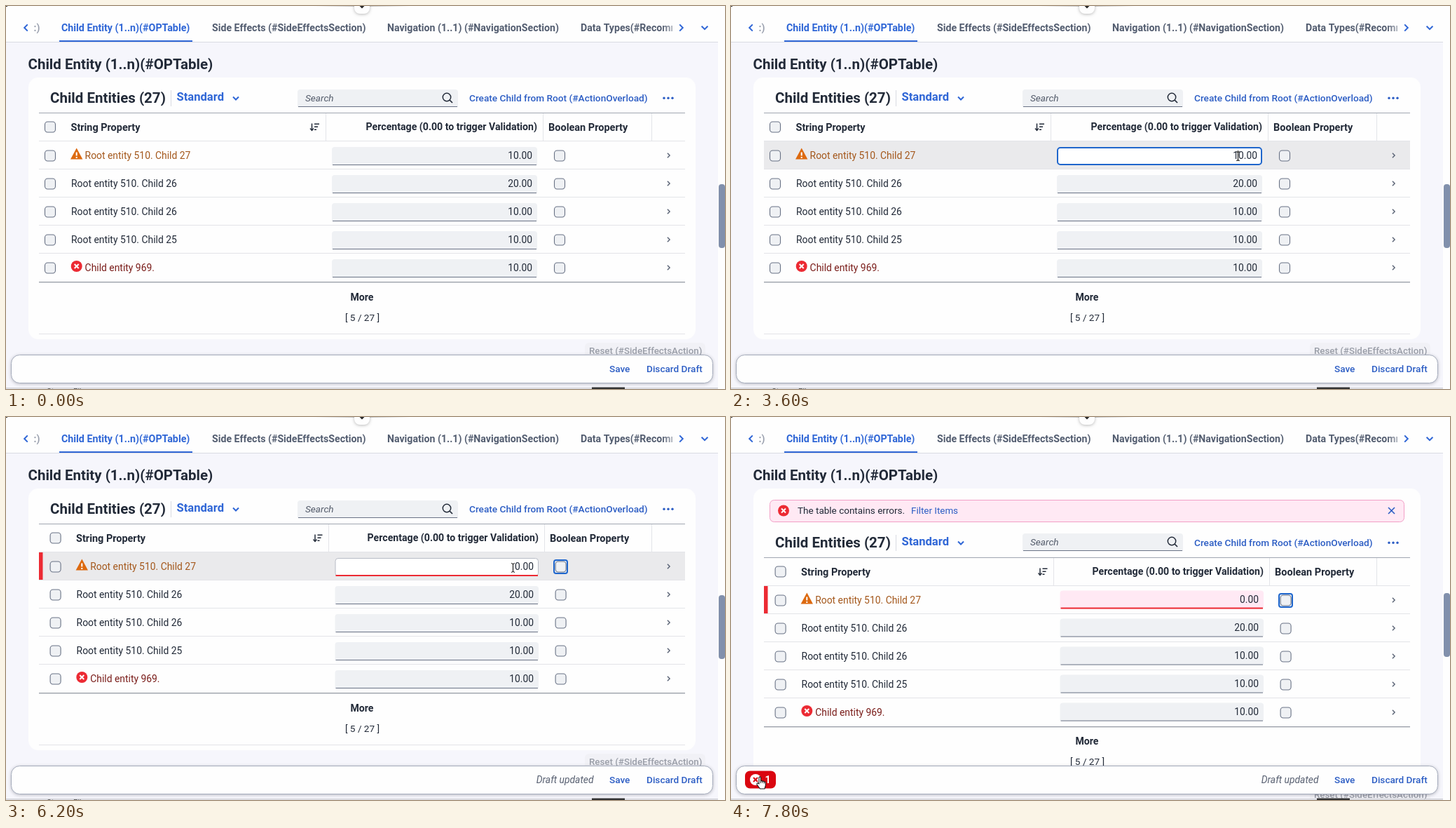
An HTML page with a canvas that plays this animation: 1026x546 px, repeating every 8 s.

```html
<!DOCTYPE html>
<html lang="en">
<head>
<meta charset="utf-8">
<title>Table validation</title>
<style>
html, body { margin: 0; width: 100%; height: 100%; overflow: hidden; background: #fefefe; }
canvas { display: block; }
</style>
</head>
<body>
<canvas id="stage" width="1026" height="546"></canvas>
<script>
const ctx = document.getElementById('stage').getContext('2d');
const LOOP = 8000, STEP = 200;
const C = {
  white: '#fefefe', page: '#f6f6fc', ink: '#222a38', blue: '#2f66d6', link: '#2c5dc4',
  tab: '#535d70', field: '#eff1f4', edge: '#697285', line: '#e3e4e8', hover: '#eaeaec',
  red: '#ec2a33', pink: '#ffe9f4', warn: '#dd6a10', warnText: '#a4581c', errText: '#7a1d1a',
  focus: '#1f66cc', focusFill: '#e6f0fb'
};
const SANS = 'Roboto, Arial, sans-serif';
const BOLD = '600';

// time, x, y, cursor kind
const cursorKeys = [
  [200, 462, 50, 'hand'], [400, 488, 112, 'hand'], [600, 508, 163, 'hand'],
  [800, 575, 167, 'hand'], [1000, 608, 168, 'beam'], [1400, 608, 168, 'beam'],
  [1800, 647, 184, 'beam'], [2400, 647, 184, 'beam'], [2800, 692, 204, 'beam'],
  [3200, 724, 214, 'beam'], [6400, 724, 215, 'hand'], [6600, 651, 256, 'hand'],
  [7000, 430, 375, 'hand'], [7400, 85, 502, 'hand'], [7600, 43, 521, 'hand'], [8000, 43, 521, 'hand']
];

const rows = [
  ['Root entity 510. Child 27', '10.00', 'warn'],
  ['Root entity 510. Child 26', '20.00'],
  ['Root entity 510. Child 26', '10.00'],
  ['Root entity 510. Child 25', '10.00'],
  ['Child entity 969.', '10.00', 'error']
];

function text(str, x, y, size, color = C.ink, style = '', align = 'left', family = SANS) {
  ctx.font = `${style} ${size}px ${family}`;
  ctx.textAlign = align;
  ctx.fillStyle = color;
  ctx.fillText(str, x, y + size * 0.35);
}

function rect(x, y, w, h, color) {
  ctx.fillStyle = color;
  ctx.fillRect(x, y, w, h);
}

function box(x, y, w, h, r, fill, stroke, width = 1) {
  ctx.beginPath();
  ctx.roundRect(x, y, w, h, r);
  if (fill) { ctx.fillStyle = fill; ctx.fill(); }
  if (stroke) { ctx.strokeStyle = stroke; ctx.lineWidth = width; ctx.stroke(); }
}

function poly(points, color, width) {
  ctx.beginPath();
  points.forEach(([x, y]) => ctx.lineTo(x, y));
  ctx.strokeStyle = color;
  ctx.lineWidth = width;
  ctx.stroke();
}

function disc(x, y, r, color) {
  ctx.beginPath();
  ctx.arc(x, y, r, 0, Math.PI * 2);
  ctx.fillStyle = color;
  ctx.fill();
}

function shadow(color, blur, dy) {
  ctx.shadowColor = color;
  ctx.shadowBlur = blur;
  ctx.shadowOffsetY = dy;
}

function chevron(x, y, dx, dy, color, width = 2) {
  const points = dx
    ? [[x - dx, y - 2 * Math.abs(dx)], [x + dx, y], [x - dx, y + 2 * Math.abs(dx)]]
    : [[x - 2 * dy, y - dy], [x, y + dy], [x + 2 * dy, y - dy]];
  poly(points, color, width);
}

function cross(x, y, r, color, width) {
  poly([[x - r, y - r], [x + r, y + r]], color, width);
  poly([[x + r, y - r], [x - r, y + r]], color, width);
}

function errorIcon(x, y, back = C.red, mark = '#fff') {
  disc(x, y, 8, back);
  cross(x, y, 3, mark, 2);
}

function warnIcon(x, y) {
  ctx.beginPath();
  ctx.moveTo(x, y - 7);
  ctx.lineTo(x + 7, y + 6);
  ctx.lineTo(x - 7, y + 6);
  ctx.closePath();
  ctx.fillStyle = ctx.strokeStyle = C.warn;
  ctx.lineWidth = 2;
  ctx.fill();
  ctx.stroke();
  rect(x - 1, y - 3, 2, 5, '#fff');
  rect(x - 1, y + 3.5, 2, 2, '#fff');
}

function checkbox(x, y) {
  box(x - 7.5, y - 7.5, 15, 15, 4, C.field, C.edge, 1.1);
}

function cursorAt(t) {
  if (t < cursorKeys[0][0]) return null;
  const i = cursorKeys.findIndex((key, n) => n && t < key[0]);
  const a = cursorKeys[i - 1], b = cursorKeys[i];
  const k = (t - a[0]) / (b[0] - a[0]);
  return { x: a[1] + (b[1] - a[1]) * k, y: a[2] + (b[2] - a[2]) * k, kind: a[3] };
}

function drawCursor({ x, y, kind }) {
  if (kind === 'beam') {
    poly([[x - 3, y - 6.5], [x - 0.5, y - 5.5], [x + 2, y - 6.5]], '#111', 1);
    poly([[x - 0.5, y - 6], [x - 0.5, y + 6]], '#111', 1.1);
    poly([[x - 3, y + 6.5], [x - 0.5, y + 5.5], [x + 2, y + 6.5]], '#111', 1);
    return;
  }
  ctx.save();
  ctx.translate(x - 7, y - 9);
  ctx.lineJoin = 'round';
  const hand = new Path2D('M4 11V1.8Q5.2 0 6.5 1.8V7Q8 6 9 7.4Q10.6 6.6 11.4 8.2Q13 7.6 13.3 9.4V13.5L12 18H5.5L1 12Q.6 9.6 2.4 9.8Z');
  ctx.fillStyle = '#fff';
  ctx.fill(hand);
  ctx.strokeStyle = '#181818';
  ctx.lineWidth = 1.1;
  ctx.stroke(hand);
  poly([[6.5, 7], [6.5, 10]], '#181818', 0.9);
  poly([[9, 7.5], [9, 10]], '#181818', 0.9);
  poly([[11.3, 8.5], [11.3, 10.5]], '#181818', 0.9);
  ctx.restore();
}

function drawTabs() {
  rect(0, 0, 1016, 51, C.white);
  rect(0, 51, 1016, 1, '#d9dbe3');
  rect(0, 0, 2, 1, '#333');
  const fade = ctx.createLinearGradient(440, 0, 576, 0);
  fade.addColorStop(0, '#bbb0');
  fade.addColorStop(0.5, '#bbb');
  fade.addColorStop(1, '#bbb0');
  rect(440, 0, 136, 1, fade);
  ctx.save();
  shadow('#0004', 4, 1);
  box(497, -12, 22, 23, 8, C.white);
  ctx.restore();
  chevron(508, 0, 0, 2, '#222', 2);

  chevron(28.5, 31, -2.3, 0, C.blue);
  text(':)', 39.5, 31, 14, '#9aa0ae', BOLD);
  text('Child Entity (1..n)(#OPTable)', 79, 31, 14.25, C.blue, BOLD);
  rect(76, 49, 190, 2, C.blue);
  text('Side Effects (#SideEffectsSection)', 294, 31, 14.15, C.tab, BOLD);
  text('Navigation (1..1) (#NavigationSection)', 544, 31, 14.15, C.tab, BOLD);
  ctx.save();
  ctx.beginPath();
  ctx.rect(815, 15, 136, 32);
  ctx.clip();
  const tail = ctx.createLinearGradient(935, 0, 955, 0);
  tail.addColorStop(0, C.tab);
  tail.addColorStop(1, '#c4c8d0');
  text('Data Types(#Recommended)', 820, 31, 14.15, tail, BOLD);
  ctx.restore();
  chevron(963.5, 31, 2.3, 0, C.blue);
  chevron(997, 31, 0, 2.2, C.blue);
}

function drawStrip() {
  box(55.5, 118.5, 905, 31, 6, C.pink, '#f29fc6');
  errorIcon(75, 133.5);
  text('The table contains errors.', 95, 133, 13.5);
  text('Filter Items', 257, 133, 13.4, C.link);
  cross(942.5, 133.5, 4.5, C.link, 1.6);
}

function drawToolbar(dy) {
  const y = 131 + dy;
  text('Child Entities (27)', 63, y, 20.5, C.ink, BOLD);
  rect(235, y - 11, 1, 23, '#d9dbe1');
  text('Standard', 243.5, y - 2, 16.6, C.blue, BOLD);
  chevron(328, y + 0.5, 0, 2, C.blue);
  const top = Math.floor(119 + dy * 0.99);
  box(416, top, 229, 25, [4, 4, 0, 0], C.field);
  rect(417, top + 24, 227, 1, C.edge);
  text('Search', 427, top + 12, 13.65, '#525a69', 'italic');
  ctx.beginPath();
  ctx.arc(629, top + 11, 5.7, 0, Math.PI * 2);
  ctx.strokeStyle = C.ink;
  ctx.lineWidth = 1.5;
  ctx.stroke();
  poly([[633, top + 15], [637, top + 19]], C.ink, 1.7);
  text('Create Child from Root (#ActionOverload)', 661, y, 13.65, C.link, '500');
  for (let i = 0; i < 3; i++) disc(939 + 6 * i, y + 0.3, 1.7, C.link);
}

function drawField(x, right, y, s, first) {
  const w = right - x;
  if (first && s.focus) {
    box(x + 1, y - 11, w - 2, 24, 4, '#fff', C.focus, 2);
    return;
  }
  const over = first && s.overField;
  const bad = first && s.invalid;
  if (over) box(x + 0.5, y - 11.5, w - 1, 25, 4, '#fff', '#b8bcc6');
  else box(x, y - 12, w, 26, [4, 4, 2, 2], bad ? C.pink : C.field);
  rect(x + 1, y + (bad ? 12 : 13), w - 2, bad ? 2 : 1, bad ? C.red : C.edge);
}

function drawTable(s) {
  const { dy, cursor } = s;
  const shift = s.invalid ? 1 : 0;
  const sel = 63 + 7.6 * shift, label = 93 + 7.6 * shift;
  const colA = 456 + 4 * shift, colB = 766 + 2 * shift;
  const fieldX = 465 + 4.5 * shift, fieldR = 758 + 2 * shift;
  const top = 152 + dy;

  if (cursor && cursor.y > top && cursor.y < top + 41 && cursor.x > colA && cursor.x < colB)
    rect(colA, top + 1, colB - colA, 40, C.hover);
  rect(47, top, 922, 1, '#a0a6b1');
  [colA, colB, 921].forEach(x => rect(x, top + 1, 1, 40, C.line));
  const hy = top + 20.5;
  checkbox(sel, hy);
  text('String Property', label - 0.5, hy, 14.45, C.ink, BOLD);
  const sx = 440 + 4.5 * shift;
  poly([[sx - 3.5, hy - 5], [sx - 3.5, hy + 5]], C.ink, 1.5);
  poly([[sx - 6, hy + 2], [sx - 3.5, hy + 5], [sx - 1, hy + 2]], C.ink, 1.4);
  [7, 5, 3].forEach((w, i) => rect(sx, hy - 5 + 4 * i, w, 1.5, C.ink));
  text('Percentage (0.00 to trigger Validation)', fieldR, hy, 14.15, C.ink, BOLD, 'right');
  text('Boolean Property', colB + 8, hy, 14.5, C.ink, BOLD);

  rows.forEach(([name, value, state], i) => {
    const y = 213 + 40 * i + dy;
    if (i === s.hoverRow) rect(47, y - 20, 922, 40, C.hover);
    rect(47, y - 21, 922, 1, C.line);
    if (!i && s.invalid) rect(47, y - 20, 5.5, 40, C.red);
    checkbox(sel, y + 0.5);
    if (state === 'warn') warnIcon(label + 7.7, y - 1.5);
    if (state === 'error') errorIcon(label + 7.7, y - 2);
    const color = { warn: C.warnText, error: C.errText }[state] || C.ink;
    text(name, label + (state ? 19.6 : 0), y, 13.9, color);
    const fy = 213 + 40 * i + dy * 0.97;
    drawField(fieldX, fieldR, fy, s, !i);
    text(!i && s.deleted ? '0.00' : value, fieldR - 7, Math.round(fy), 13.8, C.ink, '', 'right');
    if (!i && s.focus) rect(723, y - 7, 1, 15, '#111');
    const cx = 790 + 1.6 * shift;
    if (!i && s.tabbed) box(Math.round(cx) - 10, y - 9, 19, 19, 3, C.focusFill, C.focus, 2);
    checkbox(cx, y + 0.5);
    chevron(945.5, y, 1.6, 0, '#596274', 1.4);
  });
  rect(47, 393 + dy, 922, 1.3, '#969ba5');
  text('More', 508, 415 + dy * 0.99, 14.1, C.ink, BOLD, 'center');
  text('[ 5 / 27 ]', 508.5, 444.5 + dy * 0.98, 13.6, C.ink, '', 'center');
  rect(47, 467 + dy, 922, 1, C.line);
}

function drawFooter(s) {
  rect(0, 544, 1016, 1.5, '#cfd0d6');
  if (!s.strip) text('≡ Stream File', 49, 549, 11, '#555');
  rect(836, 543.5, 47, 2.5, '#333');
  ctx.save();
  shadow('#2235', 5, 1);
  box(7.5, 497.5, 1001, 40, 12, C.white);
  ctx.restore();
  box(7.5, 497.5, 1001, 40, 12, C.white, '#a4abbb');
  if (s.strip) {
    const over = s.cursor.x < 64 && s.cursor.y > 504;
    const back = over ? '#da0610' : '#e62c33';
    box(20, 504.5, 44, 25, 7, back);
    errorIcon(35, 517, '#fff', back);
    text('1', 48.5, 517, 14, '#fff', BOLD);
  }
  if (s.status) text(s.status, 838.5, 517, 13.85, '#596172', 'italic', 'right');
  text('Save', 861, 517, 13.6, C.link, '500');
  text('Discard Draft', 914, 517, 13.6, C.link, '500');
}

function stateAt(t) {
  const strip = t >= 6400;
  const dy = strip ? 48 : 0;
  const cursor = cursorAt(t);
  const row = cursor ? Math.floor((cursor.y - 193 - dy) / 40) : -1;
  const hoverRow = cursor && cursor.y < 497 && row < 5 ? row : -1;
  // the pointer rests over the field until the warning strip arrives
  if (t >= 3200 && !strip) cursor.kind = 'beam';
  return {
    strip, dy, cursor, hoverRow,
    focus: t >= 3400 && t < 4800,
    deleted: t >= 4400,
    tabbed: t >= 4800,
    invalid: t >= 6000,
    overField: hoverRow === 0 && !strip && cursor.y > 201,
    tooltip: t >= 1200 && t < 2600,
    status: t >= 6200 ? 'Draft updated' : t >= 5000 ? 'Updating draft...' : ''
  };
}

function draw(t) {
  const s = stateAt(t);
  rect(0, 0, 1026, 546, C.white);
  rect(0, 52, 1016, 494, C.page);
  drawTabs();
  text('Child Entity (1..n)(#OPTable)', 31.5, 83, 20.5, C.ink, BOLD);
  box(32, 102, 952, 373 + s.dy, 14, C.white);
  if (s.strip) drawStrip();
  drawToolbar(s.dy);
  drawTable(s);
  box(826, 480 + s.dy, 172, 26, 6, '#f1f1f6');
  text('Reset (#SideEffectsAction)', 832, 491 + s.dy * 0.98, 13.3, '#9a9ea8', '500');
  drawFooter(s);
  box(1017, s.strip ? 251 : 254, 9, 91, 4, '#8190ac');
  if (s.tooltip) {
    rect(607, 184, 258, 25, '#fefefe');
    poly([[865, 184.5], [607.5, 184.5], [607.5, 208.5], [865, 208.5]], '#777', 1);
    text('Change value to trigger validation - side effect', 615, 196, 11.33, '#4a4a4a', '', 'left', '"Open Sans", sans-serif');
  }
  if (s.cursor) drawCursor(s.cursor);
}

function tick() {
  const t = performance.now() % LOOP;
  draw(Math.floor(t / STEP) * STEP);
  requestAnimationFrame(tick);
}
tick();
</script>
</body>
</html>
```
